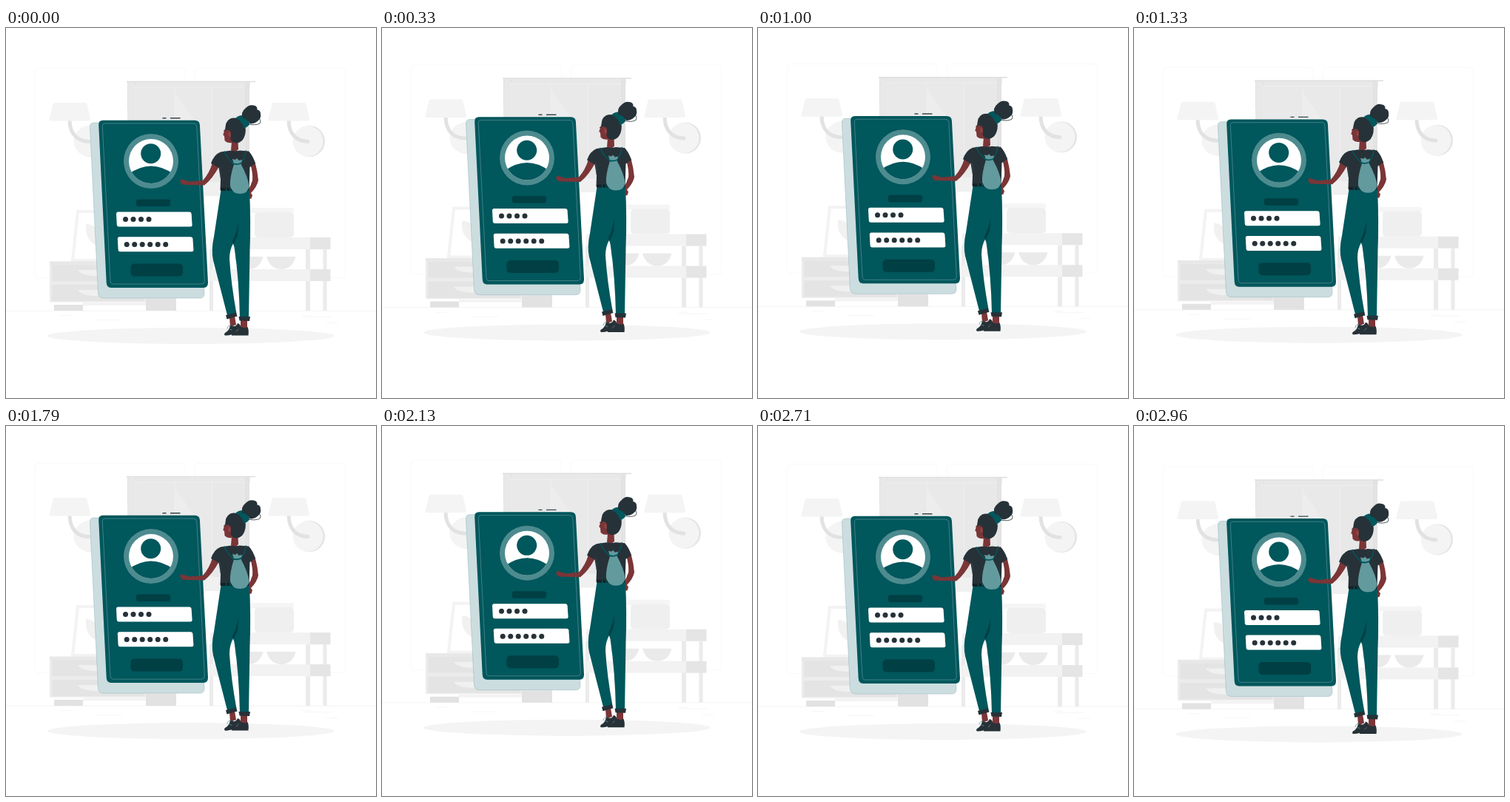
Recreate the animation shown at these times as an HTML page. Size 500 by 500 pixels, loop 3000 ms.

```html
<!DOCTYPE html>
<html>
<head>
<meta charset="utf-8">
<style>
  html, body { margin: 0; width: 100%; height: 100%; overflow: hidden; background: #fff; }
  svg { display: block; width: 100%; height: 100%; }
  .teal { fill: #00575c; } .deep { fill: #003f43; } .dark { fill: #263238; } .skin { fill: #7b3537; }
  .line { fill: none; stroke-linecap: round; stroke-linejoin: round; }
</style>
</head>
<body>
<svg viewBox="0 0 500 500">
  <defs>
    <clipPath id="face"><circle cx="196" cy="180" r="30"/></clipPath>
    <g id="lamp">
      <circle cx="410" cy="153" r="21" fill="#e4e4e4"/>
      <circle cx="408" cy="153" r="20.5" fill="#f4f4f4"/>
      <path class="line" d="M382 124C382 144 393 153 408 153.500" stroke="#e2e2e2" stroke-width="5"/>
      <path d="M362 101H403Q405 101 405.500 103L410 123Q410 125.500 408 125.500H356Q354 125.500 354.500 123L359.500 103Q360 101 362 101Z" fill="#f4f4f4"/>
    </g>
    <g id="drawer">
      <rect x="62" y="320" width="125" height="22" fill="#e4e4e4"/>
      <path d="M97 327H127V335Q103 336 97 327Z" fill="#f0f0f0"/>
    </g>
    <g id="shelf">
      <rect x="276" y="283" width="136" height="16" fill="#f2f2f2"/>
      <rect x="411" y="283" width="27.500" height="16" fill="#e5e5e5"/>
    </g>
  </defs>

  <g id="scene">
    <!-- room -->
    <g fill="none" stroke="#f9f9f9">
      <rect x="39.500" y="54.500" width="203" height="283" rx="4"/>
      <rect x="255.500" y="54.500" width="203" height="283" rx="4"/>
      <path d="M0 382.200H500" stroke="#f4f4f4"/>
      <path d="M72 388.500H88M120 394.500H157M400 388.500H412M402 390.500H440M433 398.500H449" stroke="#f6f6f6"/>
    </g>
    <rect x="164" y="73" width="165" height="153.500" fill="#e8e8e8"/>
    <path d="M173 81H224V226H173ZM228 81H278V226H228Z" fill="#e9e9e9"/>
    <path d="M228 87L254 124V226H228Z" fill="#ededed"/>
    <path d="M266 208H329V226.500H266Z" fill="#f0f0f0"/>
    <path d="M278.500 80V226M227.500 80V226M173.500 80H322" class="line" stroke="#efefef"/>
    <rect x="323" y="73" width="6" height="153" fill="#e3e3e3"/>
    <path d="M163 72.500H337" stroke="#dedede" stroke-width="1.500"/>
    <path d="M164.500 73V110M329 73V80M175 74V78" stroke="#e0e0e0"/>
    <use href="#lamp" x="-296"/>
    <use href="#lamp"/>

    <path d="M97 248H135V314H90Z" fill="none" stroke="#f3f3f3" stroke-width="4"/>
    <path d="M108 265Q119 264 126 277V295Q106 289 108 265Z" fill="#f1f1f1"/>
    <rect x="59" y="315.500" width="171" height="55" fill="#ececec"/>
    <rect x="59" y="315.500" width="130" height="4" fill="#e8e8e8"/>
    <use href="#drawer"/><use href="#drawer" y="27"/>
    <rect x="104" y="371" width="85" height="4" fill="#f3f3f3"/>
    <path d="M65 374H104V382H65ZM189 366H230V382H189Z" fill="#e2e2e2"/>

    <path d="M275 299H280V382H275ZM405 299H411V382H405ZM428.500 299H433.500V382H428.500Z" fill="#ebebeb"/>
    <use href="#shelf"/><use href="#shelf" y="43"/>
    <path d="M352 309H391.500Q387 326 372 326Q357 326 352 309ZM308 309H347.500Q343 326 328 326Q313 326 308 309Z" fill="#eaeaea"/>
    <rect x="330" y="243" width="59" height="7" rx="2" fill="#f5f5f5"/>
    <rect x="336" y="249" width="53" height="34" rx="5" fill="#efefef"/>
    <ellipse cx="250" cy="416" rx="194" ry="11" fill="#f4f4f4"/>

    <!-- login panel -->
    <path d="M113.500 134Q113 128 119 128H250L268 358Q268 365 262 365H132Q125 365 124.500 358Z" fill="#ccdddf" stroke="#8fb3b6" stroke-width=".5"/>
    <path d="M211.500 121.700H216.500M222 121.700H235.500" stroke="#37474f" stroke-width="1.400"/>
    <path class="teal" d="M125.200 131Q125 124.700 131 124.700H255Q261.500 124.700 261.900 131L273 344Q273 351 267 351H142Q136 351 135.700 344Z"/>
    <path class="line" d="M130.300 133Q130 129 134 129H254Q257.500 129 257.800 133L268.300 342Q268.300 346 264.500 346H145Q141.200 346 141 342Z" stroke="#6a9da0" stroke-width=".6"/>
    <circle cx="196" cy="180" r="37" fill="#4d8b8f"/>
    <circle cx="196" cy="180" r="30" fill="#fff"/>
    <g class="teal" clip-path="url(#face)">
      <circle cx="195.700" cy="169.700" r="13.500"/>
      <path d="M160 202Q196 171 232 202V214H160Z"/>
    </g>
    <g class="deep">
      <rect x="176" y="231.500" width="46" height="9.500" rx="3"/>
      <rect x="168.500" y="318.500" width="70.500" height="17" rx="5"/>
    </g>
    <path id="field" d="M151.500 248.500H248Q250.400 248.500 250.600 251L251.600 266Q251.600 268.500 249 268.500H152.500Q150 268.500 149.800 266L149 251Q149 248.500 151.500 248.500Z" fill="#fff"/>
    <use href="#field" x="1.800" y="33.700"/>
    <g id="dots" class="dark"></g>

    <!-- woman -->
    <path class="skin" d="M330 183Q334 197 333 206Q331 213 326 221L328 231L331.500 230.500L333 226L331 223Q339 215 341 206Q340 194 336.500 181Z"/>
    <path class="skin" d="M302 391L309 389L311 401L303 404ZM317 394H326V406H317Z"/>
    <path class="dark" d="M303 401Q310 406 313 399Q317 400 317 404L310 411Q304 416 296 415.500Q294 414 296 412Q302 409 303 401Z"/>
    <path class="dark" d="M316 403Q322 407 326.500 404Q328.500 409 327.500 415.500H305Q304 413 307 411.500Q314 410 316 403Z"/>
    <path class="line" d="M299 406Q300 401 304 402M302 407L305 408" stroke="#5e9599" stroke-width=".8"/>

    <path class="teal" d="M290.500 219H329Q331 262 329.500 300L328 392H316Q315 340 308.500 296L307 291Q302 300 302 312Q304 345 311.500 386L299.500 390L280 314Q277 300 281 282Z"/>
    <path class="deep" d="M314.500 262Q311 279 306 288L307 293L313 280Z"/>
    <path class="dark" d="M297 388L311 384.500L312.500 389.500L298.500 393.500ZM314.500 390H330L329 396L315.500 395.500Z"/>

    <path class="skin" d="M305 153H313.500L314 164Q309 170 304 165Z"/>
    <path class="skin" d="M279 182Q275 196 266 206L248 207.500L243 206L237 204L235 207L238 211.500L246 212L268 212.500Q279 204 288 187Z"/>
    <path class="dark" d="M290 167.500L304 165.500Q310 167 316 165.500L328 166.500Q334 173 337 183L329.500 188L328.500 219H289.500L290 204L287.500 189L277 183Q281 171 290 167.500Z"/>
    <path class="line" d="M289 187Q291 194 290 202" stroke="#415057" stroke-width=".6"/>
    <path d="M290 218H328" stroke="#162126" stroke-width="4"/>
    <path d="M297.500 216V221M303 216V221" stroke="#00575c" stroke-width="1.200"/>
    <path class="line" d="M295 167Q299 177 308 183M324 166Q323 177 317 182" stroke="#00575c" stroke-width="1.500"/>
    <path d="M308 184Q302 203 303 214Q306 224 316 224Q327 224 328.500 214Q327 201 317.500 184L319 178L315 179L312 176L310 178L306 177Z" fill="#629a9e"/>
    <path class="line" d="M306.500 183Q312 185.500 318 182.500" stroke="#00575c" stroke-width="1.800"/>

    <path class="skin" d="M297 133L295 139L293.300 144.500L295 146L295.500 152Q299 156 306 155L309 140Z"/>
    <path class="dark" d="M297 138Q295 127 303 122.500Q312 119 320 127Q325 133 323.500 142Q321 155 311 155.500Q305 155 303.500 150L304 141Q302 136 297 138Z"/>
    <path d="M301 140Q305 142 303 148L300 145Z" fill="#8e4548"/>
    <path d="M294 139L297 138.500" stroke="#263238"/>
    <path class="teal" d="M310.500 121.500Q314 118 319 118Q328 122 329 130Q326 135 321.500 135Q319 126 310.500 121.500Z"/>
    <path class="line" d="M328 130Q337 132 343 129Q345 126 343 123" stroke="#263238" stroke-width=".8"/>
    <path class="dark" d="M320 122Q316.500 114 324 108Q329 103 334 104.500Q340 105 339.500 110.500Q344 111 344 116Q345 122 341 125Q335 130.500 329 129Q326 122 320 122Z"/>
  </g>
</svg>
<script>
  const scene = document.getElementById('scene');
  const dots = document.getElementById('dots');
  const row = (n, x, y) => Array.from({ length: n }, (_, i) =>
    `<circle cx="${x + i * 10.5}" cy="${y}" r="3.5"/>`).join('');
  dots.innerHTML = row(4, 161.5, 258.5) + row(6, 163.2, 292.5);

  // Linear bob of 10px every 1.5s, stepped at 24 pictures a second.
  const step = 1000 / 24, period = 1500, lead = 35;
  const start = performance.now();
  function draw() {
    const t = Math.floor((performance.now() - start + 4) / step) * step + lead;
    const phase = t % period / period;
    const lift = 10 * (1 - Math.abs(1 - 2 * phase));
    scene.setAttribute('transform', `translate(0 ${(0.47 - lift).toFixed(2)})`);
    requestAnimationFrame(draw);
  }
  draw();
</script>
</body>
</html>
```
